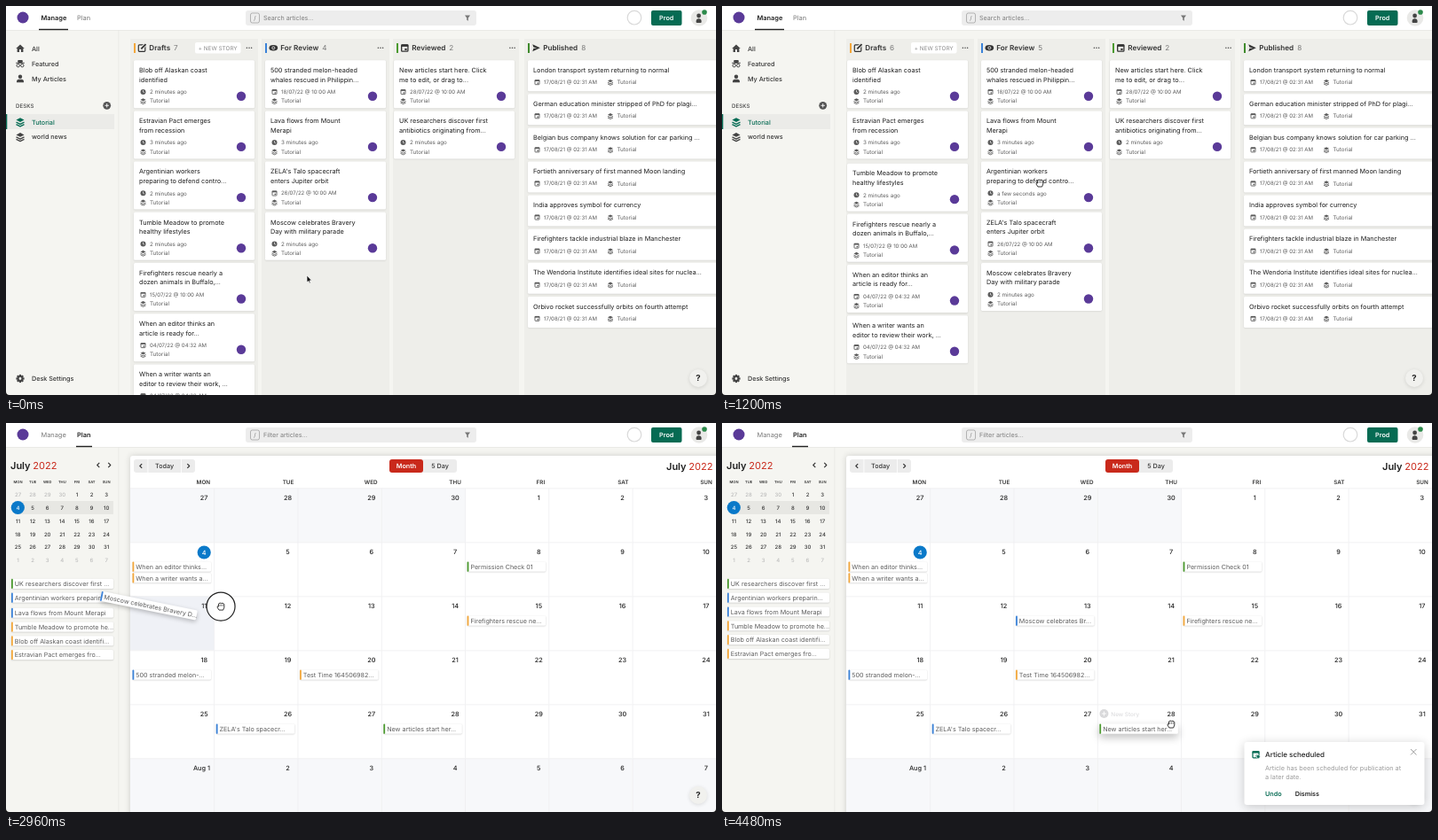
Animation, 800 px wide and 439 px high, one loop 4690 ms. Source, as an HTML page with a canvas:

```html
<!DOCTYPE html>
<html lang="en">
<head>
<meta charset="utf-8">
<title>Editorial board and planner</title>
<style>
html, body { margin: 0; width: 100%; height: 100%; overflow: hidden; background: #f5f5f1; }
canvas { display: block; width: 800px; height: 439px; }
</style>
</head>
<body>
<canvas id="stage"></canvas>
<script>
const canvas = document.getElementById('stage');
const c = canvas.getContext('2d');
const dpr = window.devicePixelRatio || 1;
canvas.width = 800 * dpr;
canvas.height = 439 * dpr;

const LOOP = 4690;
const ORANGE = '#f3a73b', BLUE = '#3b82d8', GREEN = '#4b9a2f', BRAND = '#066b53';
const INK = '#1c1c1c', GREY = '#5c5c5c', MARK = '#5a3a98', RED = '#c9291b';

// ---------- timing ----------
const seg = (t, a, b) => Math.min(1, Math.max(0, (t - a) / (b - a)));
const smooth = u => u * u * (3 - 2 * u);
const easeIn = u => u * u;
const easeOut = u => 1 - (1 - u) * (1 - u);

// keys: [time, values, easing towards this key]
function track(keys, t) {
  if (t <= keys[0][0]) return keys[0][1];
  for (let i = 1; i < keys.length; i++) {
    const [t1, v1, ease = smooth] = keys[i];
    if (t > t1) continue;
    const [t0, v0] = keys[i - 1];
    const u = ease(seg(t, t0, t1));
    return v0.map((v, k) => v + (v1[k] - v) * u);
  }
  return keys[keys.length - 1][1];
}

const pointerKeys = [
  [40, [339, 304]], [540, [207, 200]], [620, [207, 200]],
  [880, [345, 188]], [1080, [358, 200]], [1200, [358, 200]],
  [1640, [96, 16]], [2320, [96, 16]], [2760, [100, 213]], [2840, [100, 213]],
  [2960, [241, 207], easeIn], [3280, [412, 220], easeOut], [3460, [412, 221]],
  [3720, [519, 348]], [3960, [519, 348]], [4260, [506, 340]]
];
const tiltKeys = [[620, [0]], [740, [0.087]], [1060, [0.087]], [1140, [0]]];
const chipKeys = [
  [2840, [63.5, 213, 0]], [2960, [159.5, 206, 0.2], easeIn], [3280, [376, 223, 0], easeOut]
];

// ---------- drawing helpers ----------
function text(s, x, y, size, color = INK, weight = 400, align = 'left') {
  c.font = `${weight} ${size}px Inter, "Open Sans", sans-serif`;
  c.textAlign = align;
  c.fillStyle = color;
  c.fillText(s, x, y + size * 0.363);
}

function shadow(blur, dy, alpha) {
  c.shadowColor = `rgba(0,0,0,${alpha})`;
  c.shadowBlur = blur * dpr;
  c.shadowOffsetY = dy * dpr;
}

function box(x, y, w, h, r, fill, sh, stroke) {
  c.save();
  if (sh) shadow(...sh);
  c.beginPath();
  c.roundRect(x, y, w, h, r);
  if (fill) { c.fillStyle = fill; c.fill(); }
  c.shadowColor = 'transparent';
  if (stroke) { c.strokeStyle = stroke; c.stroke(); }
  c.restore();
}

function poly(p, fill, stroke, w = 1, open) {
  c.beginPath();
  for (let i = 0; i < p.length; i += 2) c.lineTo(p[i], p[i + 1]);
  if (!open) c.closePath();
  if (fill) { c.fillStyle = fill; c.fill(); }
  if (stroke) { c.strokeStyle = stroke; c.lineWidth = w; c.stroke(); }
}
const line = (p, color, w = 1) => poly(p, null, color, w, true);

function disc(x, y, r, fill, stroke, w = 1) {
  c.beginPath();
  c.arc(x, y, r, 0, 7);
  if (fill) { c.fillStyle = fill; c.fill(); }
  if (stroke) { c.strokeStyle = stroke; c.lineWidth = w; c.stroke(); }
}

function placed(x, y, fn, angle = 0, scale = 1) {
  c.save();
  c.translate(x, y);
  c.rotate(angle);
  c.scale(scale, scale);
  fn();
  c.restore();
}

function faded(alpha, fn) {
  c.save();
  c.globalAlpha *= alpha;
  fn();
  c.restore();
}

// ---------- icons ----------
function layers(x, y, col, s = 1) {
  placed(x, y, () => {
    poly([-3, -1.4, 0, -3, 3, -1.4, 0, 0.2], col);
    line([-3, 0.3, 0, 1.8, 3, 0.3], col, 0.9);
    line([-3, 1.9, 0, 3.4, 3, 1.9], col, 0.9);
  }, 0, s);
}
function clock(x, y) {
  disc(x, y, 3, GREY);
  line([x, y - 1.8, x, y, x + 1.4, y + 0.8], '#fff', 0.7);
}
function dateIcon(x, y, col = GREY, s = 1) {
  placed(x, y, () => {
    c.lineWidth = 0.9;
    box(-2.5, -2.3, 5, 5, 0.6, null, null, col);
    c.fillStyle = col;
    c.fillRect(-2.7, -2.7, 5.4, 1.7);
    c.fillRect(0, 0.4, 1.6, 1.4);
  }, 0, s);
}
function plusDisc(x, y, r, col) {
  disc(x, y, r, col);
  line([x - r / 2, y, x + r / 2, y], '#fff', 0.9);
  line([x, y - r / 2, x, y + r / 2], '#fff', 0.9);
}
function dots(x, y, vertical) {
  for (let i = -1; i < 2; i++) disc(x + (vertical ? 0 : i * 2.6), y + (vertical ? i * 2.4 : 0), 0.75, '#444');
}
function chevron(x, y, d, s = 2.6) {
  line([x - d * s / 2, y - s, x + d * s / 2, y, x - d * s / 2, y + s], '#333', 1.1);
}
function person(x, y) {
  disc(x, y - 2.2, 2.2, '#444');
  box(x - 4, y + 0.7, 8, 3.6, [2.5, 2.5, 0, 0], '#444');
}
function home(x, y) {
  poly([-4.8, 0, 0, -4.5, 4.8, 0, 3.4, 0, 3.4, 4, 1, 4, 1, 1, -1, 1, -1, 4, -3.4, 4, -3.4, 0]
    .map((v, i) => v + (i % 2 ? y : x)), '#444');
}
function glasses(x, y) {
  box(x - 2.8, y - 4, 5.6, 3, 1, '#444');
  c.fillStyle = '#444';
  c.fillRect(x - 4.8, y - 1.2, 9.6, 1);
  disc(x - 2.3, y + 2.2, 1.7, null, '#444');
  disc(x + 2.3, y + 2.2, 1.7, null, '#444');
}
function gear(x, y) {
  for (let i = 0; i < 4; i++) placed(x, y, () => {
    c.fillStyle = '#444';
    c.fillRect(-1.1, -4.6, 2.2, 9.2);
  }, i * Math.PI / 4);
  disc(x, y, 2.4, '#f5f5f1', '#444', 2);
}

const stageIcons = {
  Drafts(x, y) {
    c.lineWidth = 1.2;
    box(x - 4, y - 3.5, 7.5, 7.5, 1, null, null, '#333');
    line([x - 1, y + 1, x + 4.2, y - 4.2], '#f0f0ec', 3.6);
    line([x - 1, y + 1, x + 4.2, y - 4.2], '#333', 1.9);
  },
  'For Review'(x, y) {
    c.beginPath();
    c.ellipse(x, y, 4.8, 3.2, 0, 0, 7);
    c.fillStyle = '#333';
    c.fill();
    disc(x, y, 1.5, '#333', '#fff', 0.8);
  },
  Reviewed: (x, y) => dateIcon(x, y, '#333', 1.45),
  Published(x, y) {
    poly([x - 4, y - 4, x + 4.5, y, x - 4, y + 4, x - 3, y + 0.7, x + 1, y, x - 3, y - 0.7], '#333');
  }
};

// ---------- chrome shared by both views ----------
function topBar(plan, hover) {
  c.fillStyle = '#fff';
  c.fillRect(0, 0, 800, 27);
  c.fillStyle = '#e6e6e2';
  c.fillRect(0, 27, 800, 0.7);
  disc(19, 13, 6.5, MARK);
  text('Manage', 39.5, 13.7, 7.4, plan ? '#777' : '#222', plan ? 400 : 600);
  text('Plan', 80, 13.7, 7.4, plan || hover ? '#222' : '#777', plan ? 600 : 400);
  c.fillStyle = '#222';
  plan ? c.fillRect(79, 25.8, 18, 1.4) : c.fillRect(37, 25.8, 33, 1.4);

  box(270, 5, 260, 17, 3, '#ededed');
  c.lineWidth = 0.7;
  box(275.5, 8, 10, 11, 2, null, null, '#999');
  text('/', 280.5, 13.5, 6.5, '#777', 400, 'center');
  text(plan ? 'Filter articles...' : 'Search articles...', 290, 13.7, 7.15, '#7d7d7d');
  poly([517, 10.5, 523, 10.5, 520.8, 13.5, 520.8, 16.8, 519.2, 15.8, 519.2, 13.5], '#777');

  disc(708, 13.2, 7.8, '#fff', '#d9d9d9', 1.2);
  box(727, 5, 34.5, 17, 2, BRAND);
  text('Prod', 744.2, 13.6, 7.2, '#fff', 600, 'center');
  disc(781, 13.5, 9.3, '#e9e9e7');
  disc(780.6, 11, 2.4, '#444');
  box(777.6, 14.3, 6, 4.6, [3, 3, 1, 1], '#444');
  disc(787, 7, 2.8, '#2c8a4b');
}

function helpButton() {
  box(770, 410, 20, 20, 10, '#f1f1ee', [4, 1, 0.12]);
  text('?', 780, 420, 9.5, '#222', 700, 'center');
}

function statusBar(s) {
  box(-2, 428.5, 269, 13, [0, 3, 0, 0], '#dddee2', [3, 0, 0.25]);
  text(s, 2.5, 434.3, 6.2, '#333');
}

// ---------- board ----------
const drafts = [
  ['Blob off Alaskan coast', 'identified', '2 minutes ago'],
  ['Estravian Pact emerges', 'from recession', '3 minutes ago'],
  ['Argentinian workers', 'preparing to defend contro...', '2 minutes ago'],
  ['Tumble Meadow to promote', 'healthy lifestyles', '2 minutes ago'],
  ['Firefighters rescue nearly a', 'dozen animals in Buffalo,...', '15/07/22 @ 10:00 AM'],
  ['When an editor thinks an', 'article is ready for...', '04/07/22 @ 04:32 AM'],
  ['When a writer wants an', 'editor to review their work, ...', '04/07/22 @ 04:32 AM']
];
const review = [
  ['500 stranded melon-headed', 'whales rescued in Philippin...', '18/07/22 @ 10:00 AM'],
  ['Lava flows from Mount', 'Merapi', '3 minutes ago'],
  ['ZELA\'s Talo spacecraft', 'enters Jupiter orbit', '26/07/22 @ 10:00 AM'],
  ['Moscow celebrates Bravery', 'Day with military parade', '2 minutes ago']
];
const reviewed = [
  ['New articles start here. Click', 'me to edit, or drag to...', '28/07/22 @ 10:00 AM'],
  ['UK researchers discover first', 'antibiotics originating from...', '2 minutes ago']
];
const published = [
  'London transport system returning to normal',
  'German education minister stripped of PhD for plagi...',
  'Belgian bus company knows solution for car parking ...',
  'Fortieth anniversary of first manned Moon landing',
  'India approves symbol for currency',
  'Firefighters tackle industrial blaze in Manchester',
  'The Wendoria Institute identifies ideal sites for nuclea...',
  'Orbivo rocket successfully orbits on fourth attempt'
];
const PITCH = 57.2;
const CARD_SHADOW = [2, 0.6, 0.12];

function card(x, y, [a, b, when], sh = CARD_SHADOW, alpha = 1) {
  box(x, y, 136, 54, 1.5, alpha < 1 ? '#f9f9f8' : '#fff', sh);
  const dated = when.includes('@');
  faded(alpha, () => {
    text(a, x + 6, y + 11.2, 7.25);
    text(b, x + 6, y + 21.8, 7.25);
    (dated ? dateIcon : clock)(x + 10.5, y + 35.7);
    text(when, x + 18, y + 35.7, dated ? 6.05 : 6.25, GREY);
    layers(x + 10.5, y + 46, GREY);
    text('Tutorial', x + 18, y + 46, 6.25, GREY);
    disc(x + 121, y + 40.5, 5.2, MARK);
  });
}

function column(x, w, bar, name, count) {
  c.fillStyle = '#eeeeea';
  c.fillRect(x - 4, 37, w, 402);
  c.fillStyle = bar;
  c.fillRect(x, 42, 2, 11);
  stageIcons[name](x + 9.3, 47.3);
  text(name, x + 17.3, 47.4, 8.15, '#333', 600);
  const end = x + 17.3 + c.measureText(name).width;
  text(count, end + 4, 47.4, 8.15, '#777');
}

function boardSide() {
  home(16, 48);
  glasses(16, 65);
  person(16, 82);
  ['All', 'Featured', 'My Articles'].forEach((s, i) => text(s, 29, 48.2 + i * 17, 7.2, '#333', 500));
  text('DESKS', 11, 112.8, 6.2, '#444', 500);
  plusDisc(113.7, 112.3, 4.4, '#555');
  c.fillStyle = '#ebebe8';
  c.fillRect(0, 122, 122, 17);
  c.fillStyle = BRAND;
  c.fillRect(0, 122, 1.3, 17);
  layers(16, 130.7, BRAND, 1.5);
  text('Tutorial', 29, 131, 7.2, BRAND, 500);
  layers(16, 147.5, '#444', 1.5);
  text('world news', 29, 147.8, 7.2, '#333', 500);
  gear(16, 420.5);
  text('Desk Settings', 29, 420.7, 7.2, '#333', 500);
}

function board(t, px, py) {
  const dragging = t >= 620 && t < 1120, dropped = t >= 1120;
  const left = t >= 560 ? 141 : 144;
  const rowY = i => 61.2 + i * PITCH;
  boardSide();

  column(144, 144, ORANGE, 'Drafts', dropped ? 6 : 7);
  column(292, 144, BLUE, 'For Review', dropped ? 5 : 4);
  column(440, 142, GREEN, 'Reviewed', 2);
  column(588, 220, '#3f8a2c', 'Published', 8);
  box(213, 41, 51.5, 12.5, 2, '#fff');
  text('+ NEW STORY', 238.7, 47.4, 6.4, '#8c8c8c', 400, 'center');
  [274, 422, 570.5].forEach(x => dots(x, 47.3));

  const close = easeOut(seg(t, 1120, 1220));
  drafts.forEach((d, i) => {
    if (i !== 2) card(left, rowY(i > 2 ? i - close : i), d);
    else if (!dropped) card(left, rowY(i), d, CARD_SHADOW, dragging ? 0.4 : 1);
  });

  const later = t >= 1400;
  const old = d => later && d[2][0] === '2' && !d[2].includes('@') ? [d[0], d[1], '3 minutes ago'] : d;
  const gap = easeOut(seg(t, 720, 820));
  review.forEach((d, i) => card(292, rowY(i > 1 ? i + gap : i), old(d)));
  reviewed.forEach((d, i) => card(437, rowY(i), old(d)));
  published.forEach((s, i) => {
    const y = 61.2 + i * 38.1;
    box(588, y, 220, 35, 1.5, '#fff', CARD_SHADOW);
    text(s, 594, y + 11, 7.25);
    dateIcon(598.5, y + 24.8);
    text('17/08/21 @ 02:31 AM', 606, y + 24.8, 6.05, GREY);
    layers(681, y + 24.8, GREY);
    text('Tutorial', 688.5, y + 24.8, 6.25, GREY);
  });

  if (dropped) card(292, rowY(2), [drafts[2][0], drafts[2][1], 'a few seconds ago']);
  if (dragging) {
    if (gap > 0) faded(gap, () => {
      c.lineWidth = 1;
      box(292.5, rowY(2), 135, 54, 1, '#e6e7e8', null, '#5a9be0');
    });
    placed(px + 1.5, py + 1.5, () => card(-68, -27, drafts[2], [30, 17, 0.48]), track(tiltKeys, t)[0]);
  }
}

// ---------- planner ----------
const DAYS = ['MON', 'TUE', 'WED', 'THU', 'FRI', 'SAT', 'SUN'];
const cellX = i => 140 + i * 94.28;
const cellY = j => 73.5 + j * 61;
const dayOf = n => n < 4 ? 27 + n : n < 35 ? n - 3 : n - 34;
const offMonth = n => n < 4 || n > 34;

// column, row, slot, colour, label
const events = [
  [0, 1, 0, ORANGE, 'When an editor thinks...'],
  [0, 1, 1, ORANGE, 'When a writer wants a...'],
  [4, 1, 0, GREEN, 'Permission Check 01'],
  [4, 2, 0, ORANGE, 'Firefighters rescue ne...'],
  [0, 3, 0, BLUE, '500 stranded melon-...'],
  [2, 3, 0, ORANGE, 'Test Time 164506982...'],
  [1, 4, 0, BLUE, 'ZELA\'s Talo spacecr...'],
  [3, 4, 0, GREEN, 'New articles start her...']
];
const queue = [
  [GREEN, 'UK researchers discover first ...'],
  [BLUE, 'Argentinian workers preparin...'],
  [BLUE, 'Moscow celebrates Bravery D...'],
  [BLUE, 'Lava flows from Mount Merapi'],
  [ORANGE, 'Tumble Meadow to promote he...'],
  [ORANGE, 'Blob off Alaskan coast identifi...'],
  [ORANGE, 'Estravian Pact emerges fro...']
];

function chip(x, y, w, color, label, fill = '#fff', sh = [1.6, 0.5, 0.22]) {
  box(x, y - 5.6, w, 11.2, 1.5, fill, sh);
  box(x, y - 5.6, 1.8, 11.2, 1, color);
  text(label, x + 3.8, y + 0.2, 7.15, '#5c5c5c');
}

function monthTitle(x, y, size) {
  text('July', x, y, size, '#222', 600);
  const w = c.measureText('July ').width;
  text('2022', x + w, y, size, RED);
}

function planSide(t) {
  monthTitle(5, 48, 11);
  chevron(104, 47.5, -1);
  chevron(116.5, 47.5, 1);
  box(13, 88, 108, 15, 0, '#e7e7e3');
  disc(13.3, 95.5, 7.6, '#0a79c9');
  for (let n = 0; n < 42; n++) {
    const x = 13.5 + (n % 7) * 16.6, y = 81 + Math.floor(n / 7) * 14.8;
    if (n < 7) text(DAYS[n], x, 67, 4.1, '#333', 600, 'center');
    text(dayOf(n), x, y, 6, offMonth(n) ? '#bbb' : n === 7 ? '#fff' : '#333', 500, 'center');
  }
  if (t < 2000) return;
  const lifted = t >= 2840 && t < 3280, gone = t >= 3840;
  const k = lifted ? easeOut(seg(t, 2860, 3000)) : gone ? easeOut(seg(t, 3840, 3920)) : 0;
  queue.forEach(([color, label], i) => {
    if (i === 2 && (lifted || gone)) return;
    chip(6, 181.4 + (i > 2 ? i - k : i) * 15.8, 115, color, label);
  });
}

function newStory(i, j) {
  const x = cellX(i), y = cellY(j) + 10.5;
  plusDisc(x + 7.6, y, 5, '#d9d9db');
  text('New Story', x + 15.5, y + 0.2, 6.4, '#dcdcde', 500);
}

function popup() {
  box(420.5, 217.5, 135, 147, 2, '#f2f2f5', [12, 3, 0.28]);
  box(420.5, 217.5, 135, 3, [2, 2, 0, 0], BLUE);
  box(420.5, 334, 135, 30.5, [0, 0, 2, 2], '#ebebee');
  c.fillStyle = '#dedee2';
  c.fillRect(420.5, 333.6, 135, 0.7);
  text('Moscow celebrates Bravery', 427.5, 231.6, 7.2, '#222', 500);
  text('Day with military parade', 427.5, 242, 7.2, '#222', 500);
  dots(545, 232, true);
  text('By Plumevale Helper', 427.5, 253.7, 6.4, '#666');
  disc(436, 272, 5.4, MARK);
  ['stage', 'date', 'time'].forEach((s, i) => text(s, 453, 289 + i * 14.8, 6.3, '#333', 500, 'right'));
  text('For Review', 463, 289.7, 6.4, '#333');
  line([498.8, 288.8, 500.8, 290.8, 502.8, 288.8], '#333', 0.9);
  text('13 / 07 / 2022', 463, 305, 6.2, '#333');
  text('10 : 00 AM', 463, 320.2, 6.2, '#333');
  text('UTC', 502, 320.2, 6.2, '#b5b5b8');
  box(490, 339, 58.5, 18, 2, BRAND);
  text('Schedule', 519.2, 348.2, 7.1, '#fff', 600, 'center');
}

function toast() {
  box(588.5, 360, 203, 71, 3, '#fff', [12, 2, 0.2]);
  dateIcon(601.5, 374, BRAND, 1.4);
  disc(604.2, 376.5, 2, BRAND, '#fff', 0.6);
  text('Article scheduled', 612, 374.5, 8, '#222', 500);
  line([776, 368, 782.5, 374.5], '#888', 0.8);
  line([782.5, 368, 776, 374.5], '#888', 0.8);
  text('Article has been scheduled for publication at', 612, 389.5, 7.25, '#9a9a9a');
  text('a later date.', 612, 399.8, 7.25, '#9a9a9a');
  text('Undo', 612, 418, 7.2, BRAND, 600);
  text('Dismiss', 645.7, 418, 7.2, '#222', 600);
}

function calendar(t, drag) {
  box(140, 37, 670, 410, 3, '#fff', [7, 0, 0.16]);
  box(144, 41, 69, 15, 3, '#ececec');
  c.fillStyle = '#fff';
  c.fillRect(159.5, 41, 0.8, 15);
  c.fillRect(197, 41, 0.8, 15);
  chevron(152, 48.5, -1, 2.4);
  chevron(205.5, 48.5, 1, 2.4);
  text('Today', 178.6, 48.7, 7.2, '#333', 500, 'center');
  box(432, 41, 76, 15, 3, '#ececec');
  box(432, 41, 38, 15, 3, RED);
  text('Month', 451, 48.7, 7.2, '#fff', 600, 'center');
  text('5 Day', 489, 48.7, 7.2, '#333', 500, 'center');
  monthTitle(744, 49, 11);

  const [ox, oy] = drag ? [Math.floor((drag[0] - 140) / 94.28), Math.floor((drag[1] - 73.5) / 61)] : [-1, -1];
  for (let n = 0; n < 42; n++) {
    const i = n % 7, j = Math.floor(n / 7), x = cellX(i), y = cellY(j);
    const over = i === ox && j === oy;
    if (over || offMonth(n)) {
      c.fillStyle = over ? '#eff1f6' : '#f7f8fa';
      c.fillRect(x, y, 94.28, 61);
    }
    c.fillStyle = '#eeeef0';
    c.fillRect(x, y, 94.28, 0.8);
    if (i) c.fillRect(x, y, 0.8, 61);
    if (j === 0) text(DAYS[i], x + 90, 67, 6.3, '#333', 600, 'right');
    if (n === 7) disc(x + 83.2, y + 11.5, 7.6, '#0a79c9');
    if (n === 35) text('Aug 1', x + 90, y + 10.7, 7.3, '#222', 500, 'right');
    else text(dayOf(n), x + 83.2, y + (n === 7 ? 11.5 : 10.7), 7.3, n === 7 ? '#fff' : '#222', 500, 'center');
  }
  if (t < 2000) return;

  const hover = t >= 4000;
  for (const [i, j, slot, color, label] of events) {
    const lift = hover && i === 3 && j === 4;
    chip(cellX(i) + 2.5, cellY(j) + 27.7 + slot * 12.7, 88.5, color, label, '#fff', lift ? [10, 4, 0.25] : undefined);
  }
  if (t >= 3280) {
    const held = t < 3960;
    chip(cellX(2) + 2.5, cellY(2) + 27.7, 88.5, BLUE, 'Moscow celebrates Br...',
      held ? '#e8edf6' : '#fff', held ? [10, 4, 0.22] : undefined);
    if (held) newStory(2, 2);
  }
  if (hover) newStory(3, 4);
}

function planner(t) {
  const drag = t >= 2840 && t < 3280 ? track(chipKeys, t) : null;
  planSide(t);
  calendar(t, drag);
  const open = seg(t, 3300, 3400) * (1 - seg(t, 3880, 3960));
  if (open > 0) faded(open, popup);
  helpButton();
  const up = easeOut(seg(t, 4040, 4220));
  if (up > 0) faded(up, () => placed(0, 18 * (1 - up), toast));
  if (drag) placed(drag[0], drag[1], () =>
    chip(-55, 0, 110, ...queue[2], '#fff', [5, 2, 0.25]), drag[2]);
}

// ---------- pointer ----------
function arrow() {
  poly([0, 0, 0, 8, 1.8, 6.4, 3, 9, 4.2, 8.4, 3.1, 5.9, 5.4, 5.8], '#111', '#fff', 0.7);
}
function pointHand() {
  poly([-1, 0, 0.8, 0, 1, 3.5, 4.6, 4.6, 4.6, 7, 3.2, 9.6, -1.4, 9.6, -4, 6.4, -3, 5.4, -1, 6.8], '#fff', '#222', 0.9);
}
function grabHand() {
  poly([-2.6, -3, -1, -4, 0.5, -3.6, 2, -3.8, 3.8, -2.6, 3.8, 1, 2.6, 4, -2, 4, -4, 1, -3.6, -0.4, -2.4, 0], '#fff', '#222', 0.9);
  [-1, 0.6, 2.2].forEach(x => line([x, -2.4, x, -0.4], '#222', 0.6));
}

function pointer(t, x, y) {
  if (t >= 2860 && t < 3260) disc(x, y, 16, 'rgba(255,255,255,.85)', '#222', 1.2);
  const pointing = t >= 1560 && t < 2400 || t >= 3640 && t < 3980;
  const grabbing = t >= 500 && t < 1240 || t >= 2640 && t < 3560 || t >= 4080;
  placed(x, y, pointing ? pointHand : grabbing ? grabHand : arrow);
}

// ---------- frame ----------
function corners() {
  c.fillStyle = '#111';
  c.beginPath();
  c.rect(0, 400, 800, 39);
  c.roundRect(0, 400, 800, 39, [0, 0, 4, 4]);
  c.fill('evenodd');
}

function draw(t) {
  c.setTransform(dpr, 0, 0, dpr, 0, 0);
  c.textRendering = 'geometricPrecision';
  c.lineJoin = 'round';
  c.fillStyle = '#f5f5f1';
  c.fillRect(0, 0, 800, 439);
  c.fillStyle = '#e8e8e4';
  c.fillRect(126.5, 27, 0.8, 412);

  const plan = t >= 1800;
  const [px, py] = track(pointerKeys, t);
  topBar(plan, t >= 1600);
  if (plan) planner(t);
  else {
    board(t, px, py);
    helpButton();
  }
  if (t >= 1640 && t < 2400)
    statusBar(plan ? 'https://storipress.pro/S1DGJPM6D/scheduler' : 'Waiting for search.stori.press...');
  corners();
  pointer(t, px, py);
}

const start = performance.now();
function tick() {
  draw((performance.now() - start) % LOOP);
  requestAnimationFrame(tick);
}
tick();
</script>
</body>
</html>
```
